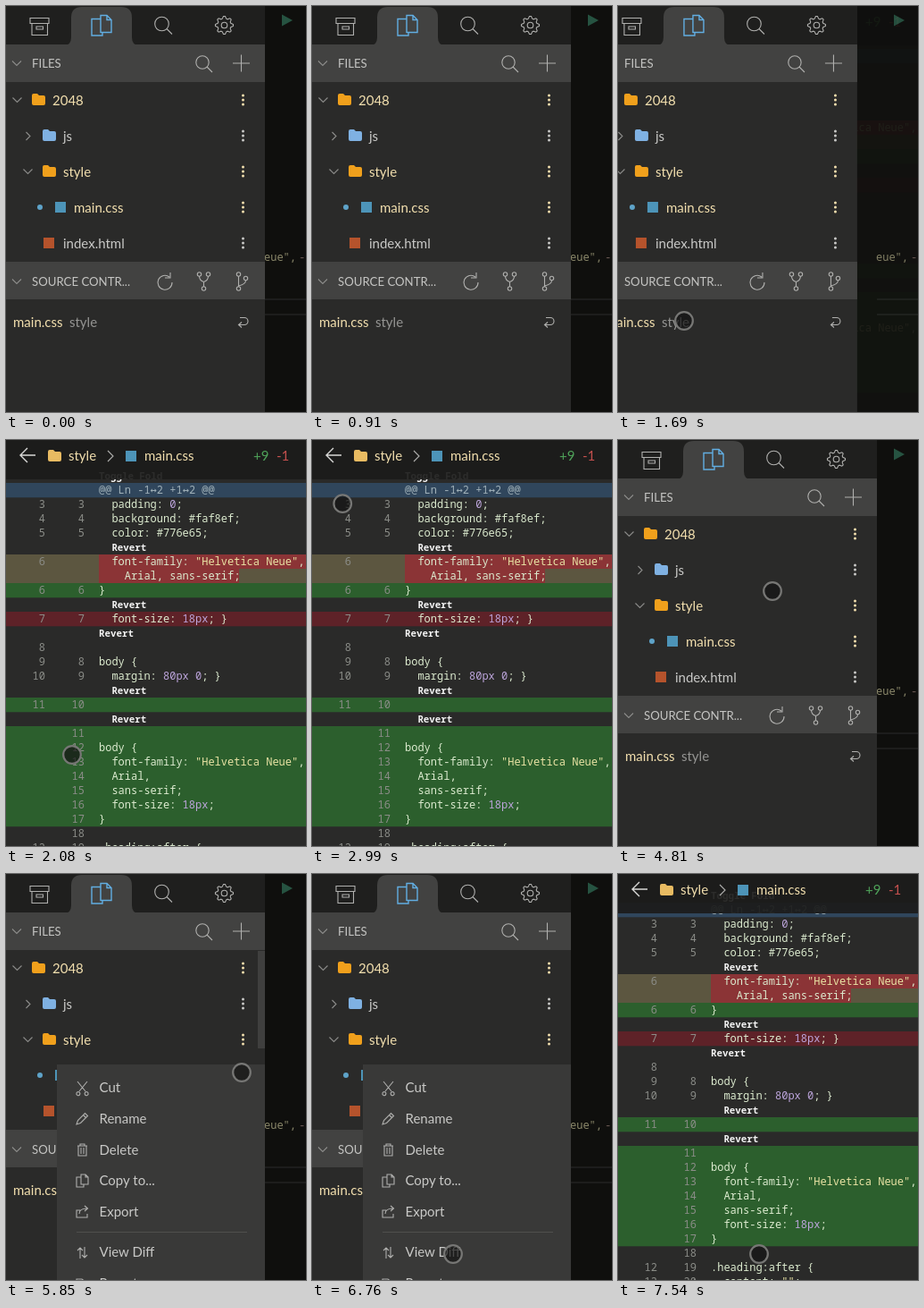
An HTML page that plays this animation: 336x454 px, repeating every 8000 ms.

```html
<!DOCTYPE html>
<html lang="en">
<head>
<meta charset="utf-8">
<title>File panel and diff view</title>
<style>
html, body { margin: 0; width: 100%; height: 100%; overflow: hidden; background: #0e0e0d; }
svg { display: block; }
text { font: 15px Lato, sans-serif; fill: #c9c9c7; white-space: pre; }
.cap { font-size: 13.2px; fill: #c4c4c2; }
.cream { fill: #f2dfae; }
.code { font: 12px "Noto Sans Mono", "DejaVu Sans Mono", monospace; fill: #dcebcf; }
.arrow { font-family: "DejaVu Sans Mono", monospace; }
.num { fill: #8b8d88; text-anchor: end; }
.revert { font-size: 10.8px; font-weight: bold; fill: #f4f4f4; }
.str { fill: #e9e3a4; }
.val { fill: #bda5dc; }
.line { fill: none; stroke: #b0b0ae; stroke-width: 1.1; }
.faint { stroke: #8c8c8a; }
.blue { stroke: #62aee2; stroke-width: 1.4; }
</style>
</head>
<body>
<svg width="336" height="454" viewBox="0 0 336 454">
  <g id="diff"></g>
  <g id="dim"></g>
  <g id="drawer"></g>
  <circle id="cursor" r="9.8" fill="#141414" fill-opacity=".7" stroke="#777775" stroke-width="2.2"/>
</svg>
<script>
const $ = id => document.getElementById(id);
const rect = (x, y, w, h, fill, more = '') =>
  `<rect x="${x}" y="${y}" width="${w}" height="${h}" fill="${fill}" ${more}/>`;
const text = (x, y, s, cls = '', more = '') =>
  `<text x="${x}" y="${y}" class="${cls}" ${more}>${s}</text>`;
const line = (d, cls = '', more = '') => `<path class="line ${cls}" d="${d}" ${more}/>`;
const ring = (x, y, r) => `<circle class="line" cx="${x}" cy="${y}" r="${r}"/>`;
const folder = (x, y, fill) =>
  `<path fill="${fill}" d="M${x} ${y - 5}q0-2 2-2h4l2 2h5q2 0 2 2v7q0 2-2 2h-11q-2 0-2-2z"/>`;
const badge = (x, y, fill) => rect(x, y - 6, 12, 12, fill);
const down = (x, y) => line(`M${x - 5} ${y - 2.5}l5 5 5-5`, 'faint');
const dots = (y, fill) => [-5, 0, 5].map(d =>
  `<circle cx="265.5" cy="${y + d}" r="1.5" fill="${fill}"/>`).join('');
const CREAM = '#f2dfae', GREY = '#c9c9c7', ORANGE = '#f0a01c', CSS_BLUE = '#4d94b8';

// Diff view
const rows = [
  ['', '', '@@ Ln -1↔2 +1↔2 @@', 'hunk'],
  [3, 3, '  padding: 0;'],
  [4, 4, '  background: #faf8ef;'],
  [5, 5, '  color: #776e65;'],
  ['', '', '  Revert'],
  [6, '', '  font-family: "Helvetica Neue",', 'old'],
  ['', '', '    Arial, sans-serif;', 'old'],
  [6, 6, '}', 'add'],
  ['', '', '  Revert'],
  [7, 7, '  font-size: 18px; }', 'del'],
  ['', '', 'Revert'],
  [8, '', ''],
  [9, 8, 'body {'],
  [10, 9, '  margin: 80px 0; }'],
  ['', '', '  Revert'],
  [11, 10, '', 'add'],
  ['', '', '  Revert'],
  ['', 11, '', 'add'],
  ['', 12, 'body {', 'add'],
  ['', 13, '  font-family: "Helvetica Neue",', 'add'],
  ['', 14, '  Arial,', 'add'],
  ['', 15, '  sans-serif;', 'add'],
  ['', 16, '  font-size: 18px;', 'add'],
  ['', 17, '}', 'add'],
  ['', 18, ''],
  [12, 19, '.heading:after {'],
  [13, 20, '  content: "";'],
];
const fills = { hunk: '#30465c', old: '#5c5640', add: '#2c5f2d', del: '#5e2228' };
const paint = s => s.replace(/(".*?")|(#\w+)|(\d+(?:px)?)/g, (m, str, hex) =>
  hex ? m : `<tspan class="${str ? 'str' : 'val'}">${m}</tspan>`);

function diffRow([a, b, src, kind], i) {
  const y = 48 + i * 16, base = y + 12.3, body = src.trim();
  const x = 104 + 7.2 * (src.length - src.trimStart().length);
  let out = kind ? rect(0, y, 336, 16.3, fills[kind]) : '';
  if (kind == 'old') out += rect(104, y, body.startsWith('Arial') ? 157 : 232, 16.3, '#8b3436');
  out += text(44, base, a, 'code num') + text(88, base, b, 'code num');
  if (body == 'Revert') return out + text(x, base - 0.5, body, 'code revert');
  if (kind == 'hunk') {
    const label = body.replaceAll('↔', '<tspan class="arrow">↔</tspan>');
    return out + text(x, base, label, 'code', 'style="fill:#9fb0b8"');
  }
  return out + text(x, base, paint(body), 'code');
}

$('diff').innerHTML = rect(0, 0, 336, 454, '#2a2a29') +
  '<g id="rows">' + text(104, 43.5, 'Toggle Fold', 'code revert') + rows.map(diffRow).join('') + '</g>' +
  rect(0, 0, 336, 44, '#1c1c1b', 'fill-opacity=".92"') +
  line('M33 17H16M24 9l-8 8 8 8', '', 'style="stroke:#d8d8d6;stroke-width:1.4"') +
  folder(47, 18, '#e8bb62') + text(70, 23, 'style', 'cream') +
  line('M114 12l6 6-6 6') + badge(134, 18, CSS_BLUE) + text(155, 23, 'main.css', 'cream') +
  text(277, 23, '+9', '', 'style="fill:#4fa35a"') + text(303, 23, '-1', '', 'style="fill:#c4504e"');

// Dimmed editor behind the drawer
$('dim').innerHTML = rect(0, 0, 336, 454, '#0f0f0d') +
  '<path fill="#265341" d="M309 9.500l12 6.500-12 6.500z"/>' +
  text(289, 285, 'eue",', 'code', 'style="fill:#8a876a"') +
  text(328, 285, '-', 'code', 'style="fill:#6b5a55"') +
  rect(290, 327, 46, 2, '#1d1d1c') + rect(290, 344, 46, 2, '#1d1d1c');

// File drawer
const gear = Array.from({ length: 32 }, (_, i) => {
  const r = i % 4 < 2 ? 10 : 7.6, a = (i - 0.5) * Math.PI / 16;
  return (244.5 + r * Math.cos(a)).toFixed(1) + ' ' + (21.5 + r * Math.sin(a)).toFixed(1);
}).join('L');

const tabs = rect(0, 0, 290, 44, '#1f1f1e') +
  '<path fill="#424241" d="M65 44q8 0 8-9V13q0-12 12-12h44q12 0 12 12v22q0 9 8 9z"/>' +
  line('M27 13.500h21v6H27zM29 19.500v13h17.500v-13M34 23h7.500v3H34z') +
  line('M106 10.500h7l5 5v14h-12zM113 10.500v5h5M106 14.500H96v18.500h12v-3.500', 'blue') +
  ring(174.5, 20, 7.8) + line('M180 25.500l6 6') +
  line(`M${gear}z`) + ring(244.5, 21.5, 3.3);

const filesBar = rect(0, 43, 290, 42, '#424241') + down(12, 64) + text(29, 69, 'FILES', 'cap') +
  ring(220, 63, 7.2) + line('M225 68l6 6M254 64h19M263.500 54.500v19');

const tree = down(12.5, 105) + folder(29, 105, ORANGE) + text(52, 110.5, '2048', 'cream') + dots(105, CREAM) +
  line('M22.500 141l4.500 4.500-4.500 4.500', 'faint') + folder(41, 145, '#7fb1e2') +
  text(64, 150.5, 'js') + dots(145, GREY) +
  down(24.5, 185) + folder(41, 185, ORANGE) + text(64, 190.5, 'style', 'cream') + dots(185, CREAM) +
  `<circle cx="38" cy="225" r="3" fill="#5ea3c8"/>` + badge(55, 225, CSS_BLUE) +
  text(76, 230.5, 'main.css', 'cream') + dots(225, CREAM) +
  badge(42, 265, '#b5532c') + text(64, 270.5, 'index.html') + dots(265, GREY);

const sourceBar = rect(0, 286, 290, 42, '#424241') + down(12, 308) + text(29, 313, 'SOURCE CONTR...', 'cap') +
  line('M183 303a8 8 0 1 0 3 6M184 298v6h-6') +
  ring(216.5, 300, 2.2) + ring(226.5, 300, 2.2) + ring(221.5, 316, 2.2) +
  line('M216.500 302q0 5 5 6.500q5-1.500 5-6.500M221.500 308v6') +
  ring(260.5, 300, 2.2) + ring(260.5, 316, 2.2) + ring(268.5, 304.5, 2.2) +
  line('M260.500 302v12M268.500 307q0 4-8 6') +
  text(8, 359, 'main.css', 'cream') + text(71, 359, 'style', '', 'style="fill:#959593"') +
  line('M262 348.500h5a4 4 0 0 1 0 8h-6M264 353.500l-3.500 3 3.500 3');

const items = [
  [239, 'Cut', 'M80 232l9 11M91 232l-9 11M82 244a2 2 0 1 1-3 1a2 2 0 0 1 3-1M89 244a2 2 0 1 0 3 1a2 2 0 0 0-3-1'],
  [274, 'Rename', 'M79 280l1.500-4.500 8-8 3 3-8 8zM86.500 269.500l3 3'],
  [309, 'Delete', 'M80 304h11M83 304v-2h5v2M81 304v11h9v-11M84 306v7M87 306v7'],
  [343, 'Copy to...', 'M84 336h5l3 3v8h-8zM89 336v3h3M84 339h-5v11h8v-3'],
  [378, 'Export', 'M83 376h-4v8h12v-4M82 380q0-6 9-6M88 371l3.500 3-3.500 3'],
  [423, 'View Diff', 'M83 430v-12M80 421l3-3 3 3M88 417v12M85 426l3 3 3-3'],
  [458, 'Revert', 'M79 453h6l4 3v8h-10z'],
];
const menu = rect(57, 213, 233, 250, '#393938') + line('M79 400.500h191', '', 'style="stroke:#4f4f4d"') +
  items.map(([y, label, d]) => line(d) + text(104.5, y + 5, label)).join('');

$('drawer').innerHTML = rect(0, 0, 290, 454, '#2a2a29') + tabs + filesBar + tree + sourceBar +
  rect(282, 86, 8, 109, '#3f3f3e', 'id="bar"') + `<g id="menu">${menu}</g>`;

// Motion: each track lists [time, ...values]
const cursorTrack = [
  [950, 140, 262, 0], [1080, 120, 290, 1], [1430, 74, 352, 1], [2600, 74, 352, 1],
  [3120, 27, 20, 1], [3380, 21, 13, 1], [4420, 21, 13, 1], [4810, 173, 169, 1],
  [5330, 264, 222, 1], [6240, 264, 222, 1], [6760, 158, 425, 1],
];
const drawerTrack = [[1620, 1], [2040, 0], [3920, 0], [4150, 1], [7080, 1], [7500, 0]];
const menuTrack = [[5500, 0], [5780, 1]];
const barTrack = [[5450, 0], [5560, 1], [5950, 1], [6240, 0]];

function sample(track, t) {
  const i = track.findIndex(k => k[0] > t);
  if (i == 0) return track[0].slice(1);
  if (i < 0) return track[track.length - 1].slice(1);
  const a = track[i - 1], b = track[i], p = (t - a[0]) / (b[0] - a[0]);
  const e = p * p * (3 - 2 * p);
  return a.slice(1).map((v, n) => v + (b[n + 1] - v) * e);
}

function draw(now) {
  const t = now % 8000;
  const [open] = sample(drawerTrack, t), [shown] = sample(menuTrack, t);
  const [x, y, alpha] = sample(cursorTrack, t);
  $('drawer').setAttribute('transform', `translate(${-290 * (1 - open)})`);
  $('dim').setAttribute('opacity', open);
  $('rows').setAttribute('transform', `translate(0 ${t > 5000 ? -16 : 0})`);
  $('menu').setAttribute('opacity', shown);
  $('menu').setAttribute('transform', `translate(0 ${12 * (1 - shown)})`);
  $('bar').setAttribute('opacity', sample(barTrack, t)[0]);
  $('cursor').setAttribute('transform', `translate(${x} ${y})`);
  $('cursor').setAttribute('opacity', alpha);
}

const start = performance.now();
function tick() {
  draw(performance.now() - start);
  requestAnimationFrame(tick);
}
tick();
</script>
</body>
</html>
```
